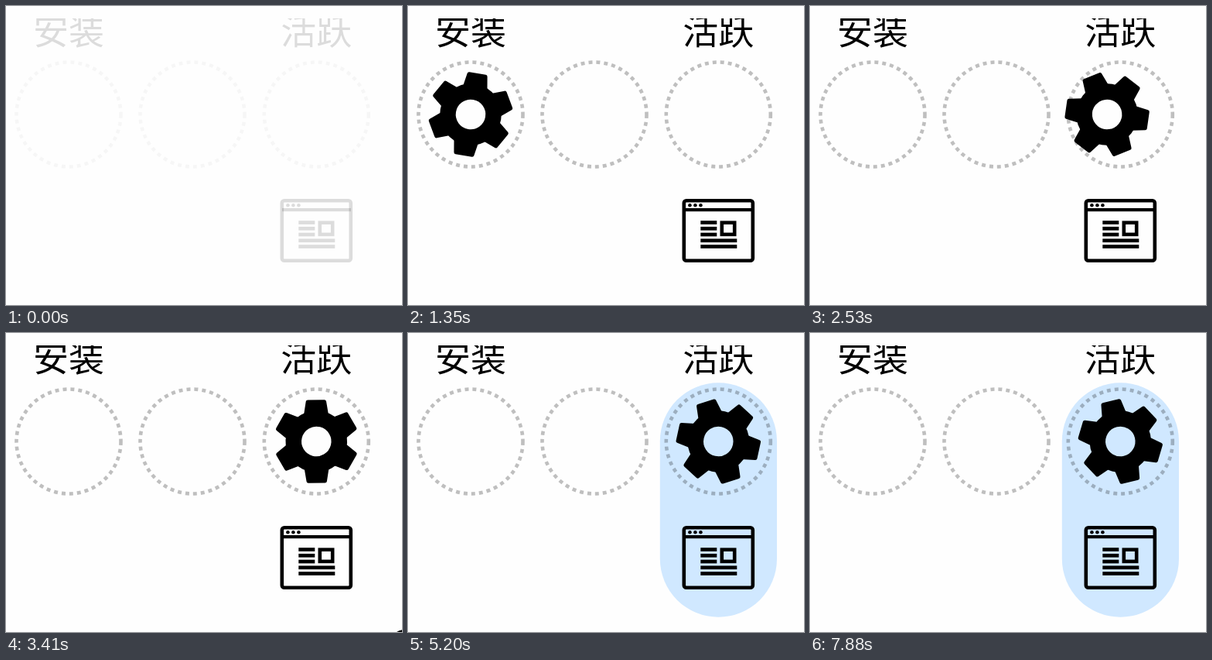
An HTML page with a canvas for the animation above (8 s loop, 512 by 386 pixels).

```html
<!DOCTYPE html>
<html lang="zh">
<head>
<meta charset="utf-8">
<style>
  html, body { margin: 0; width: 100%; height: 100%; overflow: hidden; background: #fefefe; }
  canvas { display: block; }
</style>
</head>
<body>
<canvas id="stage" width="512" height="386"></canvas>
<script>
const ctx = document.getElementById('stage').getContext('2d');
const LOOP = 8000, STEP = 148.6;
const LEFT = 81, MID = 241, RIGHT = 401.3, ROW = 140;
const TAU = Math.PI * 2;

const ramp = (t, start, length) => Math.min(1, Math.max(0, (t - start) / length));
const mix = (a, b, p) => a + (b - a) * p;

// cubic-bezier(.42, 0, .58, 1)
function easeInOut(x) {
  let lo = 0, hi = 1, s = x;
  for (let i = 0; i < 24; i++) {
    s = (lo + hi) / 2;
    const bx = 3 * (1 - s) * (1 - s) * s * 0.42 + 3 * (1 - s) * s * s * 0.58 + s * s * s;
    if (bx < x) lo = s; else hi = s;
  }
  return s * s * (3 - 2 * s);
}

function layer(alpha, draw) {
  if (alpha <= 0) return;
  ctx.save();
  ctx.globalAlpha = alpha;
  ctx.fillStyle = ctx.strokeStyle = '#000';
  draw();
  ctx.restore();
}

function label(text, x) {
  ctx.save();
  ctx.beginPath();
  ctx.rect(0, 16, 512, 60);
  ctx.clip();
  ctx.font = '46px "Noto Sans CJK SC", "Noto Sans CJK", "Noto Sans CJK JP", sans-serif';
  ctx.textAlign = 'center';
  ctx.fillText(text, x, 49);
  ctx.restore();
}

function slot(x) {
  ctx.lineWidth = 4.6;
  ctx.setLineDash([5, 5]);
  ctx.beginPath();
  ctx.arc(x, ROW, 67.5, 0, TAU);
  ctx.stroke();
  ctx.setLineDash([]);
}

function gear(x, degrees) {
  ctx.translate(x, ROW);
  ctx.rotate(degrees * Math.PI / 180);
  ctx.lineWidth = 20.5;
  ctx.beginPath();
  ctx.arc(0, 0, 29.5, 0, TAU);
  ctx.stroke();
  ctx.lineWidth = 5;
  ctx.lineJoin = 'round';
  for (let i = 0; i < 6; i++) {
    ctx.beginPath();
    ctx.moveTo(-13.5, -34);
    ctx.lineTo(-10.7, -51.2);
    ctx.lineTo(10.7, -51.2);
    ctx.lineTo(13.5, -34);
    ctx.closePath();
    ctx.fill();
    ctx.stroke();
    ctx.rotate(TAU / 6);
  }
}

function page() {
  ctx.lineWidth = 4.6;
  ctx.beginPath();
  ctx.roundRect(356.8, 251.2, 89, 77.6, 3);
  ctx.stroke();
  ctx.fillRect(357, 261, 89, 4.2);
  for (let i = 0; i < 3; i++) {
    ctx.beginPath();
    ctx.arc(364.4 + 7 * i, 257.2, 2.3, 0, TAU);
    ctx.fill();
  }
  for (let i = 0; i < 5; i++) ctx.fillRect(378.3, 277.2 + 7.75 * i, i < 3 ? 21 : 47, 4.7);
  ctx.strokeRect(405.8, 279.7, 16.4, 15.2);
}

function reload(x, y) {
  ctx.translate(x, y);
  ctx.lineWidth = 2.6;
  ctx.beginPath();
  ctx.arc(0, 0, 16.8, 0, TAU);
  ctx.stroke();
  ctx.beginPath();
  ctx.arc(0, 0, 9.3, Math.PI * 1.08, Math.PI * 2.68);
  ctx.stroke();
  ctx.beginPath();
  ctx.moveTo(-10.6, 1.8);
  ctx.lineTo(-2, 3);
  ctx.lineTo(-10.2, 11);
  ctx.fill();
}

function pill() {
  ctx.fillStyle = '#d0e8ff';
  ctx.beginPath();
  ctx.roundRect(325.8, 64.2, 151.2, 302.6, 75.6);
  ctx.fill();
}

function draw(t) {
  ctx.fillStyle = '#fefefe';
  ctx.fillRect(0, 0, 512, 386);

  const intro = ramp(t, -66, 500);
  const back = ramp(t, 4500, 500);
  const pageAlpha = Math.max(1 - ramp(t, 3650, 400), back);
  const gearX = mix(LEFT, RIGHT, easeInOut(ramp(t, 2045, 575)));
  const away = 1 - easeInOut(ramp(t, 3300, 600)) + easeInOut(ramp(t, 4500, 600));

  layer(back, pill);
  layer(intro, () => {
    label('安装', LEFT);
    label('活跃', RIGHT);
  });
  layer(intro * 0.25, () => [LEFT, MID, RIGHT].forEach(slot));
  layer(intro * pageAlpha, page);
  layer(ramp(t, 900, 400), () => gear(gearX, 24 * t / 1000 - 22.5));
  if (away < 1) layer(1, () => reload(mix(401.5, 525, away), mix(295.2, 410, away)));
}

function tick(now) {
  const t = now % LOOP;
  draw(Math.floor((t + 12) / STEP) * STEP);
  requestAnimationFrame(tick);
}
requestAnimationFrame(tick);
</script>
</body>
</html>
```
